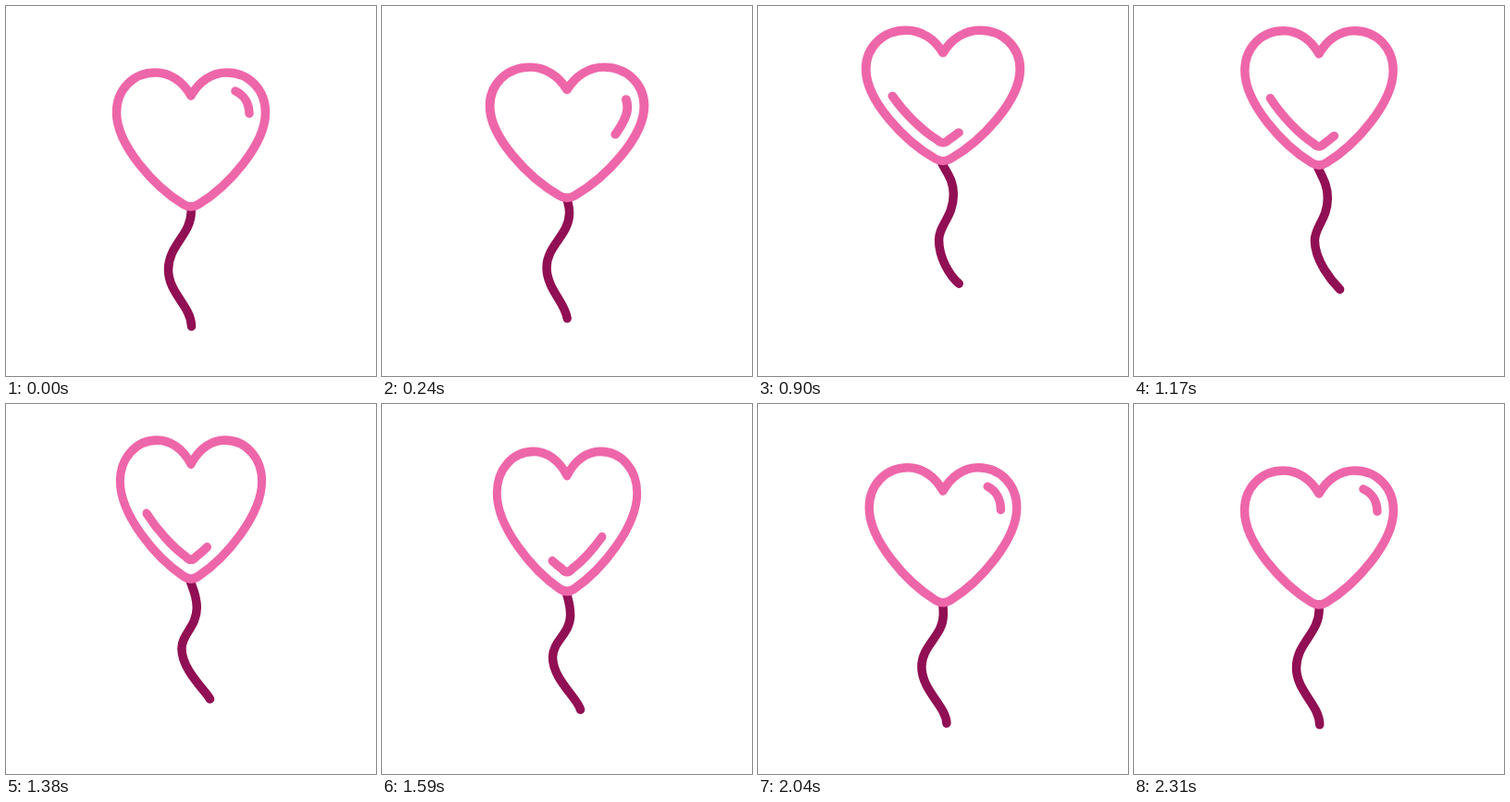
Animation, 400 px wide and 400 px high, one loop 2340 ms. Source, as an HTML page:

```html
<!DOCTYPE html>
<html lang="en">
<head>
<meta charset="utf-8">
<title>Heart balloon</title>
<style>
  html, body { margin: 0; width: 100%; height: 100%; overflow: hidden; background: #fff; }
  svg { display: block; width: 100%; height: 100%; }
  path { fill: none; stroke-width: 9.5; stroke-linecap: round; stroke-linejoin: round; }
  .string { stroke: #910f54; }
  .heart path { stroke: #ee66aa; }
</style>
</head>
<body>
<svg viewBox="0 0 400 400">
  <path class="string" id="string"/>
  <g class="heart" id="heart">
    <path d="M200 97C191 81 177 72 161.5 72C137 72 119.5 91 119.5 115C119.5 150 160 195 192 214.5Q200 219.5 208 214.5C240 195 280.5 150 280.5 115C280.5 91 263 72 238.5 72C223 72 209 81 200 97Z"/>
    <path id="shine" d="M248 92C257 96 263 105 263 117C263 137 228 179 206 193.5Q200 200 194 193.5C171 179 136 138 136 117"/>
  </g>
</svg>
<script>
const LOOP = 2340, PEAK = 1080;
const $ = id => document.getElementById(id);
const string = $('string'), heart = $('heart'), shine = $('shine');

function ease(t, from, to) {
  const u = Math.min(1, Math.max(0, (t - from) / (to - from)));
  return (1 - Math.cos(Math.PI * u)) / 2;
}

// Height of the flight, 0 to 1: an even rise, then a fall that starts fast and settles slowly
function lift(time) {
  const t = (time + LOOP) % LOOP;
  return t < PEAK ? ease(t, 0, PEAK)
    : 1 - ease(((t - PEAK) / (LOOP - PEAK)) ** 0.66, 0, 1);
}

function drawHeart(t, top, width, height) {
  heart.setAttribute('transform',
    `translate(200 ${top}) scale(${width / 80} ${height / 145}) translate(-200 -72)`);

  // The shine slides round the inner rim and back, stretching as it goes
  const slide = ease(t, 10, 825) - ease(t, 1305, 2080);
  const start = 115 * slide, end = 30 + 180 * slide;
  shine.setAttribute('stroke-dasharray', `${end - start} 999`);
  shine.setAttribute('stroke-dashoffset', -start);
}

// The string's upper bend runs ahead of the balloon and its loose end swings behind
function drawString(t, tip) {
  const up = lift(t), ahead = lift(t + 70), behind = lift(t - 180);
  const x0 = 200 - 2.5 * up;
  const x1 = 200 + 11.5 * lift(t + 100), y1 = tip + 5 + 32 * Math.sqrt(up);
  const x2 = 175.5 + 21.5 * up, y2 = 285 - 35 * up ** 1.3;
  const x3 = 200 + 23 * behind, y3 = 347 - 48 * ahead;
  const d1 = y1 - tip, d2 = y2 - y1, d3 = y3 - y2;

  string.setAttribute('d', `M${x0} ${tip}`
    + `C${200 + (x1 - 200) * 0.3} ${tip + d1 * 0.35} ${x1} ${y1 - d1 * 0.45} ${x1} ${y1}`
    + `C${x1} ${y1 + d2 * (0.4 + 0.1 * up)} ${x2} ${y2 - d2 * (0.42 - 0.1 * up)} ${x2} ${y2}`
    + `C${x2} ${y2 + d3 * 0.42} ${x3 - 10 * ahead} ${y3 - 22 + 14 * Math.sqrt(up)} ${x3} ${y3}`);
}

function draw(t) {
  // Widens on the way up, narrows on the way down
  const wide = ease(t, 0, 540) - ease(t, 540, 1180);
  const slim = ease(t, 1110, 1500) - ease(t, 1500, 2220);
  const stretch = 7 * wide - 4.9 * slim;
  const top = 72 - 49 * lift(t), height = 145 - 1.3 * stretch;

  drawHeart(t, top, 80 + stretch, height);
  drawString(t, top + height);
}

const begin = performance.now();
function tick() {
  draw((performance.now() - begin) % LOOP);
  requestAnimationFrame(tick);
}
tick();
</script>
</body>
</html>
```
